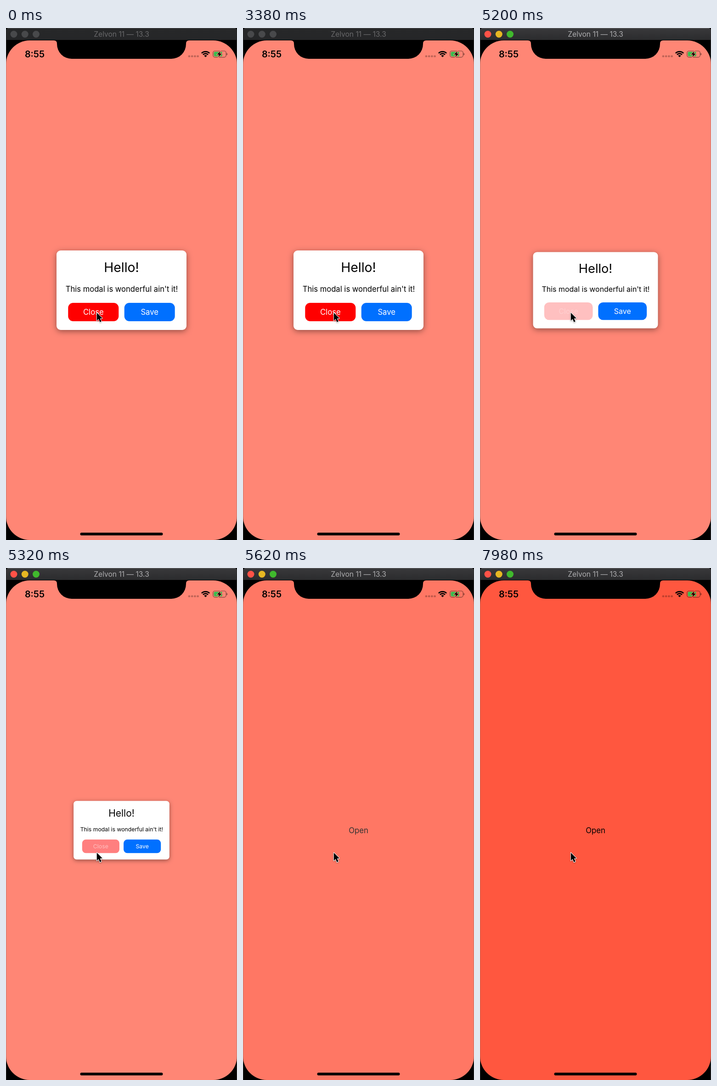
Write an HTML page with a canvas that moves like this. It is 503 by 1114 pixels and loops after 8000 ms.

```html
<!DOCTYPE html>
<html lang="en">
<head>
<meta charset="utf-8">
<title>Modal demo</title>
<style>
  html, body { margin: 0; width: 100%; height: 100%; overflow: hidden; background: #000; }
  canvas { display: block; }
</style>
</head>
<body>
<canvas id="stage" width="503" height="1114"></canvas>
<script>
const ctx = document.getElementById('stage').getContext('2d');
const W = 503, H = 1114, LOOP = 8000;
const CORAL = '#ff573f';
const CENTER = { x: 251.5, y: 570.5 };
const DIM = 0.28;

// Times below are in ticks, counted from the tick at 5200 ms.
const PRESS = { start: -6, length: 4.5 };
const RELEASE = { start: -1.26, length: 7.5 };
const SHRINK = { start: -1.26, length: 9 };
const FADE = { start: 7.8, length: 3 };

// The screen updates unevenly: three ticks every 140 ms, at 0, 20 and 40 ms.
function tickAt(ms) {
  const u = ms - 5160;
  const group = Math.floor(u / 140);
  const rest = u - group * 140;
  return group * 3 + Math.min(2, Math.floor(rest / 20)) - 2;
}

function easeInOut(p) {
  return p < 0.5 ? 2 * p * p : 1 - 2 * (1 - p) * (1 - p);
}

function progress(tick, { start, length }) {
  return easeInOut(Math.max(0, Math.min(1, (tick - start) / length)));
}

function box(x, y, w, h, r, color) {
  ctx.beginPath();
  ctx.roundRect(x, y, w, h, r);
  ctx.fillStyle = color;
  ctx.fill();
}

function disc(x, y, r, color) {
  ctx.beginPath();
  ctx.arc(x, y, r, 0, Math.PI * 2);
  ctx.fillStyle = color;
  ctx.fill();
}

function polygon(points) {
  ctx.beginPath();
  points.forEach(([x, y]) => ctx.lineTo(x, y));
  ctx.closePath();
}

function label(text, x, y, size, color, weight = 400) {
  ctx.font = `${weight} ${size}px Inter, "Open Sans", sans-serif`;
  ctx.textAlign = 'center';
  ctx.fillStyle = color;
  ctx.fillText(text, x, y);
}

function drawTitleBar(active) {
  const bar = ctx.createLinearGradient(0, 0, 0, 26);
  bar.addColorStop(0, active ? '#39393b' : '#272829');
  bar.addColorStop(1, active ? '#2b2c2e' : '#252628');
  box(0, 0, W, 26, [5, 5, 0, 0], bar);
  ctx.fillStyle = active ? '#69696b' : '#505153';
  ctx.fillRect(4, 0, W - 8, 1);
  const lights = active ? ['#ff5247', '#e6b723', '#40b92d'] : Array(3).fill('#48494b');
  lights.forEach((color, i) => disc(17 + i * 24.25, 13.5, 7.5, color));
  label('Zelvon 11 — 13.3', 251.5, 19.4, 15.6, active ? '#aeaeb0' : '#69696b');
}

function drawNotch() {
  ctx.beginPath();
  ctx.moveTo(104, 26);
  ctx.lineTo(104, 27);
  ctx.quadraticCurveTo(111, 27, 111, 34);
  ctx.arcTo(111, 67, 144, 67, 32);
  ctx.arcTo(392, 67, 392, 34, 32);
  ctx.lineTo(392, 34);
  ctx.quadraticCurveTo(392, 27, 399, 27);
  ctx.lineTo(399, 26);
  ctx.fillStyle = '#000';
  ctx.fill();
}

function drawWifi() {
  const x = 434.5, y = 63.5;
  const from = -Math.PI * 0.75, to = -Math.PI * 0.25;
  ctx.strokeStyle = '#000';
  ctx.lineWidth = 2.7;
  for (const r of [12.2, 7.8]) {
    ctx.beginPath();
    ctx.arc(x, y, r, from, to);
    ctx.stroke();
  }
  ctx.beginPath();
  ctx.moveTo(x, y);
  ctx.arc(x, y, 4.5, from, to);
  ctx.fillStyle = '#000';
  ctx.fill();
}

function drawBattery(background) {
  ctx.beginPath();
  ctx.roundRect(450.8, 50, 28.4, 13.6, 4);
  ctx.strokeStyle = 'rgba(0,0,0,.5)';
  ctx.lineWidth = 1.2;
  ctx.stroke();
  box(480.4, 54.5, 1.7, 4.8, [0, 2, 2, 0], 'rgba(0,0,0,.5)');
  box(452.6, 51.8, 18.4, 10, 2.4, '#38bd4f');
  polygon([[466.6, 50.6], [459.8, 57.7], [464, 57.7], [462.6, 63.2], [469.6, 55.8], [465.2, 55.8]]);
  ctx.strokeStyle = background;
  ctx.lineWidth = 2;
  ctx.stroke();
  ctx.fillStyle = '#000';
  ctx.fill();
}

function drawStatusBar(background) {
  label('8:55', 62.5, 64, 19.8, '#000', 600);
  for (let i = 0; i < 4; i++) box(396.8 + i * 6.2, 59.4, 4.4, 4.2, 1.3, 'rgba(0,0,0,.26)');
  drawWifi();
  drawBattery(background);
}

function drawButton(text, x, color) {
  box(x, 598, 110, 40, 11, color);
  label(text, x + 55, 624, 16.7, '#fff');
}

function drawModal(scale, closeAlpha) {
  if (scale <= 0.001) return;
  ctx.save();
  ctx.translate(CENTER.x, CENTER.y);
  ctx.scale(scale, scale);
  ctx.translate(-CENTER.x, -CENTER.y);

  ctx.save();
  ctx.shadowColor = 'rgba(0,0,0,.42)';
  ctx.shadowBlur = 13 * scale;
  ctx.shadowOffsetY = 3 * scale;
  box(110, 484, 283, 173, 9, '#fff');
  ctx.restore();

  label('Hello!', 251.5, 531, 28.3, '#000');
  label("This modal is wonderful ain't it!", 252, 574, 16.6, '#000');
  drawButton('Save', 257.7, '#0070ff');
  ctx.globalAlpha = closeAlpha;
  drawButton('Close', 135.3, '#f00');
  ctx.restore();
}

function drawCursor() {
  polygon([[197.8, 619.5], [197.8, 636.8], [201.6, 633.2], [204.6, 640], [207.7, 638.6],
           [204.8, 632], [209.8, 631.6]]);
  ctx.save();
  ctx.shadowColor = 'rgba(0,0,0,.35)';
  ctx.shadowBlur = 3;
  ctx.shadowOffsetY = 1;
  ctx.strokeStyle = '#fff';
  ctx.lineWidth = 2;
  ctx.lineJoin = 'round';
  ctx.stroke();
  ctx.restore();
  ctx.fillStyle = '#000';
  ctx.fill();
}

function draw(ms) {
  const tick = tickAt(ms);
  const dim = DIM * (1 - progress(tick, FADE));
  const scale = 1 - progress(tick, SHRINK);
  const closeAlpha = 1 - 0.8 * (progress(tick, PRESS) - progress(tick, RELEASE));
  const blend = c => Math.round(c + (255 - c) * dim);
  const background = `rgb(255,${blend(87)},${blend(63)})`;

  ctx.fillStyle = '#000';
  ctx.fillRect(0, 0, W, H);
  drawTitleBar(tick >= PRESS.start);

  box(0, 27, W, H - 27, 52, CORAL);
  label('Open', CENTER.x, 576.5, 16.7, '#000');
  box(0, 27, W, H - 27, 52, `rgba(255,255,255,${dim})`);
  ctx.fillStyle = 'rgba(120,120,120,.4)';
  ctx.fillRect(0, 26, 1, H - 26);
  ctx.fillRect(W - 1, 26, 1, H - 26);

  drawNotch();
  drawStatusBar(background);
  drawModal(scale, closeAlpha);
  box(161.5, 1098, 180, 6, 3, '#000');
  drawCursor();
}

function loop() {
  draw(performance.now() % LOOP);
  requestAnimationFrame(loop);
}
loop();
</script>
</body>
</html>
```
